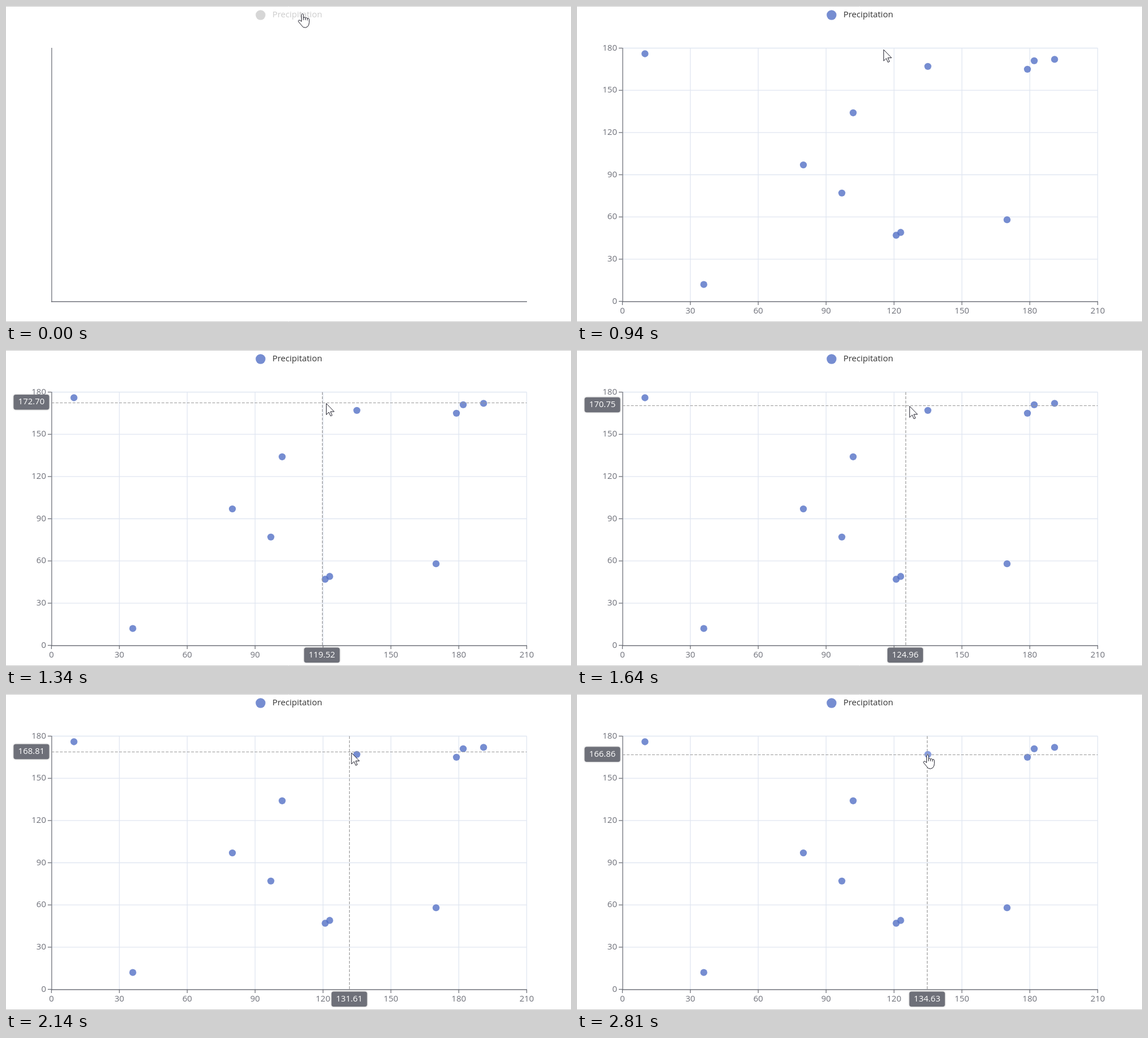
These frames come from a looping animation (1001x559 px, 2.84 s). An HTML page with a canvas:

```html
<!DOCTYPE html>
<html lang="en">
<head>
<meta charset="utf-8">
<title>Scatter chart</title>
<style>
html, body { margin: 0; width: 100%; height: 100%; overflow: hidden; background: #fff; }
canvas { display: block; }
</style>
</head>
<body>
<canvas id="stage" width="1001" height="559"></canvas>
<script>
const ctx = document.getElementById('stage').getContext('2d');
const LOOP = 2840, STEP = 100;
const GREY = '#6e7079', BLUE = '#5470c6', LIGHT_BLUE = '#6b86d8', OFF = '#ccc';
const LEFT = 80.5, RIGHT = 922.5, TOP = 74.5, BOTTOM = 522.5;
const UNIT = 2.423; // stage pixels per whole pointer step
const px = v => LEFT + (RIGHT - LEFT) * v / 210;
const py = v => BOTTOM - (BOTTOM - TOP) * v / 180;
const clamp = v => Math.min(1, Math.max(0, v));
const crisp = v => Math.round(v) + 0.5;

// Chart data: x, y
const points = [[10, 176], [36, 12], [80, 97], [97, 77], [102, 134], [121, 47],
  [123, 49], [135, 167], [170, 58], [179, 165], [182, 171], [191, 172]];

// Pointer route: time, x, y
const route = [[500, 524.4, 13.2], [940, 542.8, 77], [1240, 559.7, 92.7],
  [1840, 603.3, 102.4], [2370, 617.9, 104.8], [2710, 620.4, 107.2]];

const arrow = new Path2D('M0 0V19.8L4.6 15.4 7.6 22.2 10.4 21 7.4 14.4H14Z');
const hand = new Path2D('M-1.5 14V1.5Q.2-1.5 2 1.5V7.5Q4 5 5.5 7.5Q7.5 6 9 8.5Q11.5 7 12.3 10V16' +
  'Q12 20 9.5 23Q6 26 1.5 24L-6.5 14.5Q-8 11.5-5 11.5Q-3 12-1.5 14Z' +
  'M2 7.5V11.5M5.5 7.5V11.5M9 8.5V12');

// The picture moves in bursts of even steps with a short rest between them
function snapTime(t) {
  const [start, end] = t < 640 ? [0, 500] : t < 2450 ? [640, 2340] : [2370, 2810];
  return start + STEP * Math.floor((Math.min(t, end) - start) / STEP);
}

function pointerAt(t) {
  let [, x, y] = route[0];
  for (let i = 1; i < route.length; i++) {
    const [t0, x0, y0] = route[i - 1], [t1, x1, y1] = route[i];
    const f = clamp((t - t0) / (t1 - t0));
    x += (x1 - x0) * f;
    y += (y1 - y0) * f;
  }
  return [x, y];
}

function line(x1, y1, x2, y2, color, width = 1.3) {
  ctx.strokeStyle = color;
  ctx.lineWidth = width;
  ctx.beginPath();
  ctx.moveTo(x1, y1);
  ctx.lineTo(x2, y2);
  ctx.stroke();
}

function text(s, x, y, color, align) {
  ctx.fillStyle = color;
  ctx.textAlign = align;
  ctx.fillText(s, x, y);
}

function disc(x, y, r, color) {
  ctx.globalAlpha = 0.8;
  ctx.fillStyle = color;
  ctx.beginPath();
  ctx.arc(x, y, r, 0, 7);
  ctx.fill();
  ctx.globalAlpha = 1;
}

function grid() {
  for (let v = 0; v <= 210; v += 30) {
    const x = px(v);
    if (v) line(x, TOP, x, BOTTOM, '#e0e6f1');
    line(x, BOTTOM, x, 529, GREY);
    text(v, x, 543.5, GREY, 'center');
  }
  for (let v = 0; v <= 180; v += 30) {
    const y = py(v);
    if (v) line(LEFT, y, RIGHT, y, '#e0e6f1');
    line(74, y, LEFT, y, GREY);
    text(v, 71, y + 4, GREY, 'right');
  }
}

function tag(value, x, y) {
  ctx.save();
  ctx.shadowColor = '#aaa';
  ctx.shadowBlur = 3;
  ctx.fillStyle = GREY;
  ctx.beginPath();
  ctx.roundRect(x - 31.5, y - 13.2, 63, 26.5, 3.75);
  ctx.fill();
  ctx.restore();
  text(value.toFixed(2), x, y + 4, '#fff', 'center');
}

// Readings move in whole pointer steps
function crosshair([x, y]) {
  const vx = 119.52 + 0.6045 * Math.round((x - 559.7) / UNIT);
  const vy = 172.70 - 0.973 * Math.round((y - 92.7) / UNIT);
  const cx = px(vx), cy = py(vy);
  ctx.setLineDash([5, 2.5]);
  line(LEFT, crisp(cy), RIGHT, crisp(cy), '#999', 1.2);
  line(crisp(cx), TOP, crisp(cx), BOTTOM, '#999', 1.2);
  ctx.setLineDash([]);
  tag(vy, 45, cy - 0.5);
  tag(vx, cx, 539.7);
}

function cursor([x, y], shape) {
  ctx.save();
  ctx.translate(x + 0.5, y + 0.3);
  ctx.fillStyle = '#fff';
  ctx.strokeStyle = '#1c1c28';
  ctx.lineWidth = 1;
  ctx.lineJoin = 'round';
  ctx.fill(shape);
  ctx.stroke(shape);
  ctx.restore();
}

function draw(t) {
  const pos = pointerAt(t), on = t >= STEP, onLegend = pos[1] < 25;
  const radius = 6.2 * (1 - (1 - clamp((t - 50) / 250)) ** 3);
  let hover = onLegend;

  ctx.fillStyle = '#fff';
  ctx.fillRect(0, 0, 1001, 559);
  ctx.font = '15px "Open Sans", "Noto Sans", sans-serif';
  for (const y of [0.5, 558.5]) line(0, y, 1001, y, OFF, 1);

  if (on) grid();
  line(81, TOP - 0.5, 81, BOTTOM + 1, GREY);
  line(80, 523, 923, 523, GREY);
  if (on) {
    for (const [vx, vy] of points) {
      const x = px(vx) - 0.2, y = py(vy);
      const hit = Math.hypot(x - pos[0], y - pos[1]) < 6;
      hover ||= hit;
      disc(x, y, radius, hit || onLegend ? LIGHT_BLUE : BLUE);
    }
  }
  disc(451, 16, 8.7, on ? BLUE : OFF);
  text('Precipitation', 472, 20, on ? '#333' : OFF, 'left');

  // The crosshair trails the pointer by one step
  if (t >= 1040) crosshair(pointerAt(t - STEP));
  cursor(pos, hover ? hand : arrow);
}

function frame(now) {
  draw(snapTime(now % LOOP));
  requestAnimationFrame(frame);
}
requestAnimationFrame(frame);
</script>
</body>
</html>
```
